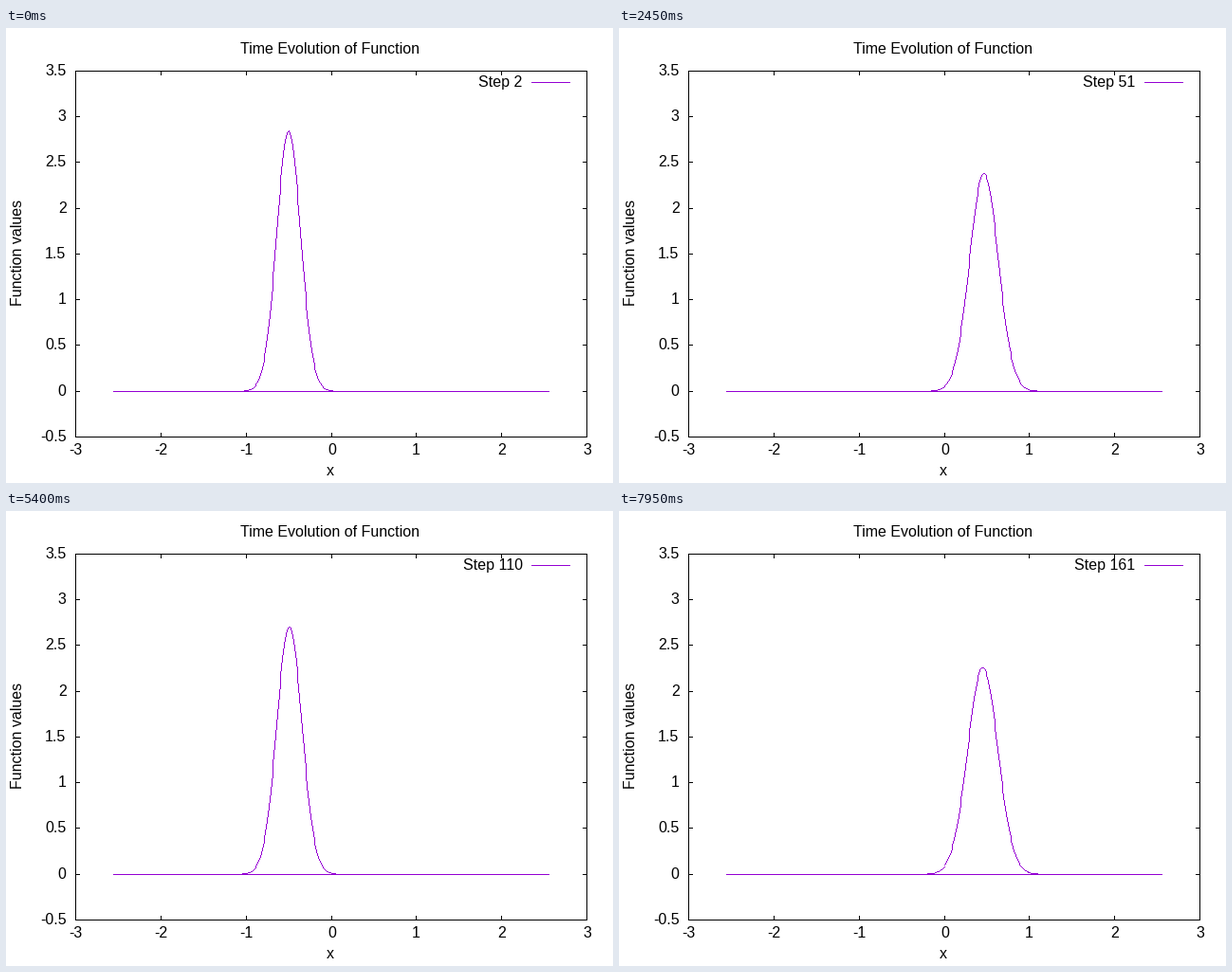
Recreate the animation shown at these times as a matplotlib script. Size 640 by 480 pixels, loop 8 s.

```python
import numpy as np
import matplotlib.pyplot as plt
from matplotlib.animation import FuncAnimation

plt.rcParams["font.family"] = "Liberation Sans"

DPI, WIDTH, HEIGHT = 100, 640, 480
FONT_SIZE = 16 * 72 / DPI          # 16 pixels
LEFT, RIGHT, TOP, BOTTOM = 73, 612, 45, 431
TICK = 4
FRAMES, INTERVAL, FIRST_STEP = 160, 50, 2

OMEGA = 0.0565                     # phase advance per step
VAR_MIN, VAR_MAX = 0.0197, 0.0825  # packet variance at the turning points / middle
AMPLITUDE = 0.5

BLACK, VIOLET = (0, 0, 0), (148, 0, 211)


def to_px(x):
    return np.floor(LEFT + (RIGHT - LEFT) * (x + 3) / 6 + 0.5).astype(int)


def to_py(y):
    return np.ceil(BOTTOM - (BOTTOM - TOP) * (y + 0.5) / 4 - 0.5).astype(int)


def density(x, step):
    phase = OMEGA * (step - FIRST_STEP)
    center = -AMPLITUDE * np.cos(phase)
    var = VAR_MIN * np.cos(phase) ** 2 + VAR_MAX * np.sin(phase) ** 2
    return np.exp(-(x - center) ** 2 / (2 * var)) / np.sqrt(2 * np.pi * var)


def segment(img, x0, y0, x1, y1, color):
    """Hard-edged line, one pixel wide."""
    dx, dy = x1 - x0, y1 - y0
    n = max(abs(dx), abs(dy), 1)
    # Walk along the longer axis in its rising direction
    if (dy if abs(dy) > abs(dx) else dx) < 0:
        x0, y0, dx, dy = x1, y1, -dx, -dy
    k = np.arange(n + 1)
    xs = x0 + np.sign(dx) * ((2 * abs(dx) * k + n) // (2 * n))
    ys = y0 + np.sign(dy) * ((2 * abs(dy) * k + n) // (2 * n))
    img[ys, xs] = color


def polyline(img, xs, ys, color):
    for x0, y0, x1, y1 in zip(xs[:-1], ys[:-1], xs[1:], ys[1:]):
        segment(img, x0, y0, x1, y1, color)


fig = plt.figure(figsize=(WIDTH / DPI, HEIGHT / DPI), dpi=DPI, facecolor="white")
ax = fig.add_axes([0, 0, 1, 1])
ax.axis("off")


def label(x, y, text, ha="center", **kw):
    return ax.text(x, y, text, ha=ha, va="baseline", fontsize=FONT_SIZE,
                   color="black", **kw)


# Frame, ticks, tick labels and key sample
base = np.full((HEIGHT, WIDTH, 3), 255, np.uint8)
polyline(base, [LEFT, RIGHT, RIGHT, LEFT, LEFT],
         [TOP, TOP, BOTTOM, BOTTOM, TOP], BLACK)
for v in range(-3, 4):
    x = to_px(v)
    segment(base, x, BOTTOM, x, BOTTOM - TICK, BLACK)
    segment(base, x, TOP, x, TOP + TICK, BLACK)
    label(x + 0.6, 450, f"{v}")
for v in np.arange(-0.5, 3.6, 0.5):
    y = to_py(v)
    segment(base, LEFT, y, LEFT + TICK, y, BLACK)
    segment(base, RIGHT, y, RIGHT - TICK, y, BLACK)
    label(63.5, y + 5, f"{v:g}", ha="right")
segment(base, 554, 57, 594, 57, VIOLET)

label(341.5, 27, "Time Evolution of Function")
label(341.9, 472, "x")
label(17, 237, "Function values", rotation=90, rotation_mode="anchor")
key = label(544.5, 62, "", ha="right")

# The samples run from just above 0 to the right end, then wrap to the left
# end and come back to 0; the wrap draws the baseline.
grid = np.concatenate([np.arange(1, 257), np.arange(-255, 1)]) / 100
grid_px = to_px(grid)

picture = ax.imshow(base, extent=(0, WIDTH, HEIGHT, 0), aspect="auto",
                    interpolation="nearest")


def draw(frame):
    step = FIRST_STEP + frame
    img = base.copy()
    polyline(img, grid_px, to_py(density(grid, step)), VIOLET)
    picture.set_data(img)
    key.set_text(f"Step {step}")
    return picture, key


anim = FuncAnimation(fig, draw, frames=FRAMES, interval=INTERVAL,
                     repeat=True, repeat_delay=0)
plt.show()
```
